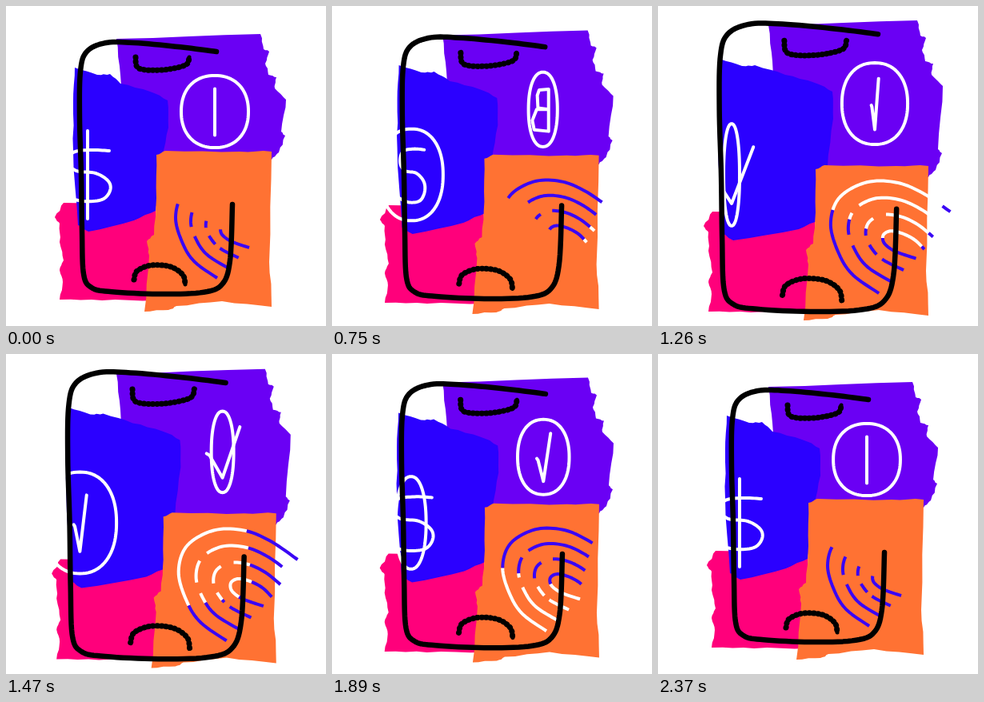
An HTML page with a canvas that plays this animation: 400 px wide and 400 px high, repeating every 2.4 s.

```html
<!DOCTYPE html>
<html lang="en">
<head>
<meta charset="utf-8">
<title>Phone payment collage</title>
<style>
html, body { margin: 0; width: 100%; height: 100%; overflow: hidden; background: #fff; }
canvas { display: block; width: 100vmin; height: 100vmin; }
</style>
</head>
<body>
<canvas id="stage" width="400" height="400"></canvas>
<script>
const ctx = document.getElementById('stage').getContext('2d');
const LOOP = 2400, WHITE = '#fff', BLACK = '#000', INK = '#3a06f5';
const { sin, cos, abs, sign, min, max, floor, ceil, PI } = Math;

// Paper pieces: corners left or right of, above or below mid are pulled
// by [left, top, right, bottom] as the collage stretches.
const papers = [
  { color: '#6a00f4', mid: [240, 140], pull: [0, -17, 6, 22],
    corners: [[138,41], [318,35], [322,54], [329,57], [324,72], [328,86], [338,89], [336,103],
      [350,117], [344,157], [349,162], [341,183], [332,192], [150,200], [143,86]] },
  { color: '#ff007b', mid: [125, 300], pull: [-4, 11, 9, 15],
    corners: [[72,246], [187,246], [187,368], [120,368], [67,367], [71,345], [67,330], [72,318],
      [67,295], [67,272], [61,264]] },
  { color: '#2b00ff', mid: [140, 190], pull: [-9, -11, 16, 11],
    corners: [[86,77], [114,86], [130,85], [143,97], [180,107], [202,118], [203,152], [196,190],
      [187,256], [160,268], [103,282], [90,274], [84,180], [84,120]] },
  { color: '#ff7233', mid: [250, 280], pull: [9, 18, 6, 11],
    corners: [[188,186], [199,181], [292,182], [332,182], [329,320], [332,376], [270,369],
      [213,375], [203,380], [173,382], [179,312], [176,294], [185,286], [188,240]] }
];

const phone = [[263,57], [215,51], [160,46], [125,46], [101,57], [93,82], [92,140], [94,210], [95,280],
  [97,335], [107,352], [130,357], [190,360], [245,358], [270,348], [280,318], [283,248]];
const notch = [[162,64], [166,78], [195,80], [224,74], [229,64]];
const chin = [[160,342], [164,331], [182,324], [206,326], [221,336], [224,348]];

// Ridges run from the right end over the top to the bottom;
// the middle ones are blends of the outer and the inner.
const outer = [[341,251], [312,231], [283,219], [250,219], [221,236], [212,265], [221,297], [236,320], [264,340]];
const inner = [[313,292], [303,282], [290,275], [277,272], [269,276], [269,284], [276,291], [286,296], [304,302]];
const solid = [[[0, 1]], [[.05, .46], [.52, .65], [.71, 1]], [[0, .35], [.45, .62], [.7, .8], [.86, 1]], [[0, 1]]];
const ridges = solid.map((parts, k) => ({ parts, pts: outer.map((p, i) => mix(p, inner[i], k / 3)) }));

const dollarS = [[27,-30], [5,-31], [-18,-28], [-24,-15], [-14,-5], [10,-2], [26,8], [28,20], [18,31], [-5,33], [-26,28]];
const tick = [[-22,2], [-18,4], [0,31], [24,-30]];
const letterB = [[9,-26], [9,28], [-14,26], [-17,14], [-10,0], [9,0], [-8,-2], [-9,-18], [-6,-25], [9,-26]];

// Start and duration of the colour changes that run along the ridges.
const waves = [[230, 1010], [700, 1000], [1210, 1090], [1780, 1120]];

function mix(a, b, u) {
  return a.map((v, k) => v + (b[k] - v) * u);
}

// Point on a Catmull-Rom curve, u from 0 to 1.
function along(p, u) {
  const last = p.length - 1, i = min(last - 1, floor(u * last)), f = u * last - i;
  const a = p[max(0, i - 1)], b = p[i], c = p[i + 1], d = p[min(last, i + 2)];
  return b.map((v, k) => v + .5 * f * (c[k] - a[k]
    + f * (2 * a[k] - 5 * v + 4 * c[k] - d[k] + f * (3 * (v - c[k]) + d[k] - a[k]))));
}

function curve(p, from = 0, to = 1) {
  const steps = max(2, ceil((to - from) * p.length * 8));
  return Array.from({ length: steps + 1 }, (_, i) => along(p, from + (to - from) * i / steps));
}

function trace(p) {
  ctx.beginPath();
  p.forEach(([x, y]) => ctx.lineTo(x, y));
}

function line(p, color, width, cap = 'round') {
  trace(p);
  ctx.strokeStyle = color;
  ctx.lineWidth = width;
  ctx.lineCap = cap;
  ctx.lineJoin = 'round';
  ctx.stroke();
}

function noise(i) {
  const v = sin(i * 127.1) * 43758.5;
  return (v - floor(v)) * 2 - 1;
}

function paper({ color, mid, pull, corners }, s) {
  const p = corners.map(c => c.map((v, k) => v + s * pull[v < mid[k] ? k : k + 2]));
  const torn = [];
  p.forEach((a, i) => {
    const b = p[(i + 1) % p.length];
    for (let j = 0; j < 4; j++)
      torn.push(mix(a, b, j / 4).map((v, k) => v + (j && noise(i * 8 + j * 2 + k))));
  });
  trace(torn);
  ctx.fillStyle = color;
  ctx.fill();
}

function ring(cx, cy, rx, ry) {
  const bend = v => sign(v) * abs(v) ** .9, p = [];
  for (let a = 0; a <= 96; a++)
    p.push([cx + rx * bend(cos(a * PI / 48)), cy + ry * bend(sin(a * PI / 48))]);
  line(p, WHITE, 4);
}

function glyph(p, cx, cy, sx, sy) {
  line(p.map(([x, y]) => [cx + x * sx, cy + y * sy]), WHITE, 4);
}

function rough(p) {
  line(curve(p), BLACK, 5);
  ctx.setLineDash([.5, 5]);
  line(curve(p), BLACK, 7);
  ctx.setLineDash([]);
}

function draw(t) {
  const s = 1.02 * ((1 + cos(2 * PI * (t - 1340) / LOOP)) / 2) ** 2;
  const x = 2 * PI * (t - 20) / LOOP;
  const turn = x - sin(x), ringTurn = turn + .25 * (1 + cos(x)) * sin(x);
  const grow = p => p.map(([x, y]) => [x + (x - 188) * .16 * s, y + (y - 208) * .145 * s]);
  const wave = (k, time = t) => min(1, max(0, (time - waves[k][0]) / waves[k][1]));

  const flow = (from, to, color) => {
    for (const { pts, parts } of ridges) {
      const p = grow(pts);
      for (const [a, b] of parts) {
        const lo = max(a, from), hi = min(b, to);
        if (hi > lo) line(curve(p, lo, hi), color, 4, 'butt');
      }
    }
  };

  ctx.fillStyle = WHITE;
  ctx.fillRect(0, 0, 400, 400);
  papers.forEach(piece => paper(piece, s));

  // The coins flip: ring and symbol are a quarter turn apart.
  const px = 261 + 10 * s, py = 132 - 10 * s, tall = 1 + .1 * s;
  ring(px, py, 42 * abs(cos(ringTurn)), 45 + 6 * s);
  glyph(sin(turn) > 0 ? letterB : tick, px, py, abs(sin(turn)) * .95, tall * .95);

  const bx = 102 - 10 * s, big = 1 + .16 * s;
  ring(bx, 211, 48 * abs(sin(turn)), 55 * big);
  glyph(cos(turn) > 0 ? curve(dollarS) : tick, bx, 211, abs(cos(turn)) * big, big);

  flow(wave(1), wave(0), INK);
  flow(wave(2), wave(1), WHITE);
  flow(wave(3), wave(2), INK);
  flow(wave(3, t + LOOP), 1, INK);

  line(curve(grow(phone)), BLACK, 6.5);
  rough(grow(notch));
  rough(grow(chin));
}

function play() {
  draw(floor(performance.now() % LOOP / 30) * 30);
  requestAnimationFrame(play);
}
play();
</script>
</body>
</html>
```
